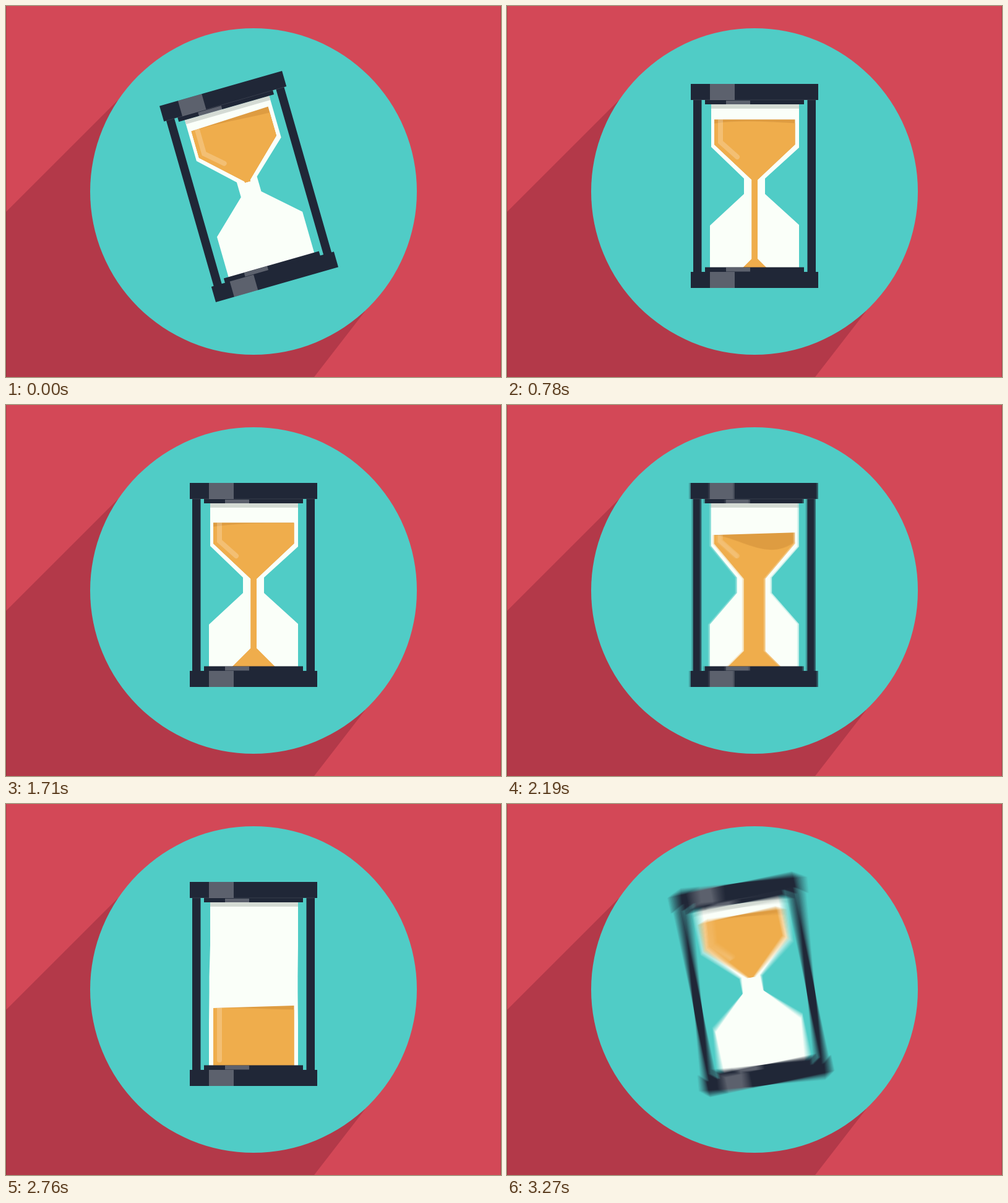
Write an HTML page with a canvas that moves like this. It is 800 px wide and 600 px high and loops after 3300 ms.

```html
<!DOCTYPE html>
<html lang="en">
<head>
<meta charset="utf-8">
<title>Hourglass</title>
<style>
  html, body { margin: 0; width: 100%; height: 100%; overflow: hidden; background: #d34857; }
  canvas { display: block; }
</style>
</head>
<body>
<canvas id="stage" width="800" height="600"></canvas>
<script>
const LOOP = 3300, STEP = 30, SHUTTER = 15, POSES = 16;
const PIVOT = { x: 400, y: 318 };
const BOX = { x: 160, y: 78, size: 480 };
const C = {
  red: '#d34857', shade: '#b33949', teal: '#50ccc6', dark: '#202737',
  glass: '#fafff9', rim: '#d4dbd4', sand: '#efad4c', back: '#de9c41',
  shine: 'rgba(255,255,255,.27)', gloss: 'rgba(255,255,255,.22)', edge: 'rgba(0,0,0,.15)'
};

const ctx = document.getElementById('stage').getContext('2d');
const buffer = document.createElement('canvas');
buffer.width = buffer.height = BOX.size;
const g = buffer.getContext('2d', { willReadFrequently: true });

// Motion rules, all in milliseconds of the loop
const ramp = (t, a, b) => Math.min(1, Math.max(0, (t - a) / (b - a)));
const ease = (t, a, b) => { const u = ramp(t, a, b); return u * u * (3 - 2 * u); };
const whip = u => u ** 2.63 / (u ** 2.63 + (1 - u) ** 1.79);

const angle = t =>
  -16 * (1 - ease(t, 0, 450)) + 22 * ease(t, 2850, 2970) - 382 * whip(ramp(t, 2970, LOOP))
  - 16 * whip(ramp(t, 2970, LOOP));

const shake = t => {
  const u = ramp(t, 2190, 2670);
  return -9.5 * (1 - u) * Math.sin(u * Math.PI * 8);
};

const lift = t => ease(t, 3090, 3240);
const open = t => ease(t, 2095, 2420) - ease(t, 3090, 3210);

const mound = t =>
  Math.min(65, (5.5 + t / 60) * ramp(t, 450, 600) + 23 * ease(t, 2190, 2340)) * (1 - ramp(t, 3060, 3090));

const bottom = t => 280 + 143 * (ramp(t, -85, 480) ** 2 - lift(t));

function surface(t) {
  const full = 178 + Math.min(t, 2760) * 0.0072 + 131 * ease(t, 2095, 2540);
  const level = full + (178 - full) * lift(t);
  const tilt = 4 * (1 - ramp(t, 0, 500) + ramp(t, 2095, 2190))
    + 51 * ease(t, 2850, 3030) * (1 - lift(t)) - 2 * shake(t);
  const surge = ease(t, 1900, 2190) - ease(t, 2190, 2700);
  const calm = ease(t, 0, 500) - ease(t, 1710, 2190);
  const near = 10 * (1 - ramp(t, 0, 1900) + ramp(t, 2190, 3060)) + 15 * surge;
  return {
    left: level + 0.3 * tilt,
    right: level - 0.7 * tilt,
    depth: [6.5 * calm, 5 * surge, 0.7 * near + 36 * surge, near]
  };
}

// Drawing helpers
function poly(c, points) {
  c.beginPath();
  points.forEach(([x, y]) => c.lineTo(x, y));
  c.closePath();
}

function rect(c, color, x1, y1, x2, y2) {
  c.fillStyle = color;
  c.fillRect(x1, y1, x2 - x1, y2 - y1);
}

function disc(c, x, y, r) {
  c.beginPath();
  c.arc(x, y, r, 0, Math.PI * 2);
}

function background() {
  rect(ctx, C.red, 0, 0, 800, 600);
  poly(ctx, [[0, 333], [181, 152], [400, 300], [580, 494], [498, 600], [0, 600]]);
  ctx.fillStyle = C.shade;
  ctx.fill();
  rect(ctx, C.edge, 0, 0, 1, 600);
  rect(ctx, C.edge, 799, 0, 800, 600);
  disc(ctx, 400, 300, 264);
  ctx.fillStyle = C.teal;
  ctx.fill();
}

function glass(s) {
  const w = s + 12.5 - (s - 4.5) / 10;
  poly(g, [
    [330, 159], [472, 159], [472, 229], [400 + w, 279], [400 + w, 304], [472, 354], [472, 424],
    [328, 424], [328, 355], [400 - w, 304], [400 - w, 279], [330, 228]
  ]);
  g.fillStyle = C.glass;
  g.fill();
  rect(g, C.rim, 330, 159, 472, 166);
}

function sand(t, s) {
  const m = Math.max(s, mound(t)), b = bottom(t);
  const side = [[65, 100], [65, 224], [s, Math.min(281, b)], [s, b - (m - s)], [m, b]];
  const { left, right, depth } = surface(t);

  g.save();
  poly(g, [
    ...side.map(([x, y]) => [400 - x, y]),
    ...side.reverse().map(([x, y]) => [400.5 + x, y])
  ]);
  g.clip();
  poly(g, [[335, left], [466, right], [466, 430], [335, 430]]);
  g.clip();
  rect(g, C.back, 330, 100, 470, 430);

  const [p, q, r, e] = depth.map((d, i) => [335 + 131 * i / 3, left + (right - left) * i / 3 + d]);
  g.beginPath();
  g.moveTo(...p);
  g.bezierCurveTo(...q, ...r, ...e);
  g.lineTo(466, 430);
  g.lineTo(335, 430);
  g.fillStyle = C.sand;
  g.fill();

  const k = ramp(open(t), 0.21, 1);
  g.beginPath();
  g.moveTo(345, 150);
  g.lineTo(345, 220 + k * 100);
  g.lineTo(372 - k * 27, 244 + k * 170);
  g.strokeStyle = C.gloss;
  g.lineWidth = 8;
  g.lineCap = 'round';
  g.stroke();
  g.restore();
}

function frame() {
  for (const x of [301, 485.5]) rect(g, C.dark, x, 151, x + 13.5, 431);
  rect(g, C.dark, 320, 151, 480, 159);
  rect(g, C.dark, 320, 422.5, 480, 431);
  for (const y of [126, 430]) {
    rect(g, C.dark, 297, y, 503, y + 26);
    rect(g, C.shine, 328, y, 368, y + 26);
  }
  for (const y of [153, 423]) rect(g, C.shine, 354, y, 393, y + 6.5);
  rect(g, 'rgba(255,255,255,.12)', 301, 151.5, 499, 152.3);
}

function hourglass(t, u) {
  rect(g, C.teal, 0, 0, BOX.size, BOX.size);
  g.save();
  g.translate(PIVOT.x - BOX.x + shake(u), PIVOT.y - BOX.y);
  g.rotate(angle(u) * Math.PI / 180);
  g.translate(-PIVOT.x, -PIVOT.y);
  const s = 4.5 + 60.5 * open(t);
  glass(s);
  sand(t, s);
  frame();
  g.restore();
}

// Average of the poses taken while the shutter is open
function blurred(t, t0, t1) {
  const sum = new Uint16Array(BOX.size * BOX.size * 4);
  let shot;
  for (let i = 0; i < POSES; i++) {
    hourglass(t, t0 + (t1 - t0) * i / (POSES - 1));
    shot = g.getImageData(0, 0, BOX.size, BOX.size);
    const px = shot.data;
    for (let j = 0; j < sum.length; j++) sum[j] += px[j];
  }
  for (let j = 0; j < sum.length; j++) shot.data[j] = sum[j] / POSES;
  g.putImageData(shot, 0, 0);
}

function draw(t) {
  background();
  const t0 = Math.max(0, t - SHUTTER / 2), t1 = t + SHUTTER / 2;
  const travel = Math.abs(angle(t1) - angle(t0)) + Math.abs(shake(t1) - shake(t0));
  if (travel < 0.3) hourglass(t, t);
  else blurred(t, t0, t1);

  ctx.save();
  disc(ctx, PIVOT.x, PIVOT.y, 226);
  ctx.clip();
  ctx.drawImage(buffer, BOX.x, BOX.y);
  ctx.restore();
}

const start = performance.now();
let shown = -1;
function tick() {
  const t = Math.floor(((performance.now() - start) % LOOP) / STEP) * STEP;
  if (t !== shown) draw(shown = t);
  requestAnimationFrame(tick);
}
tick();
</script>
</body>
</html>
```
